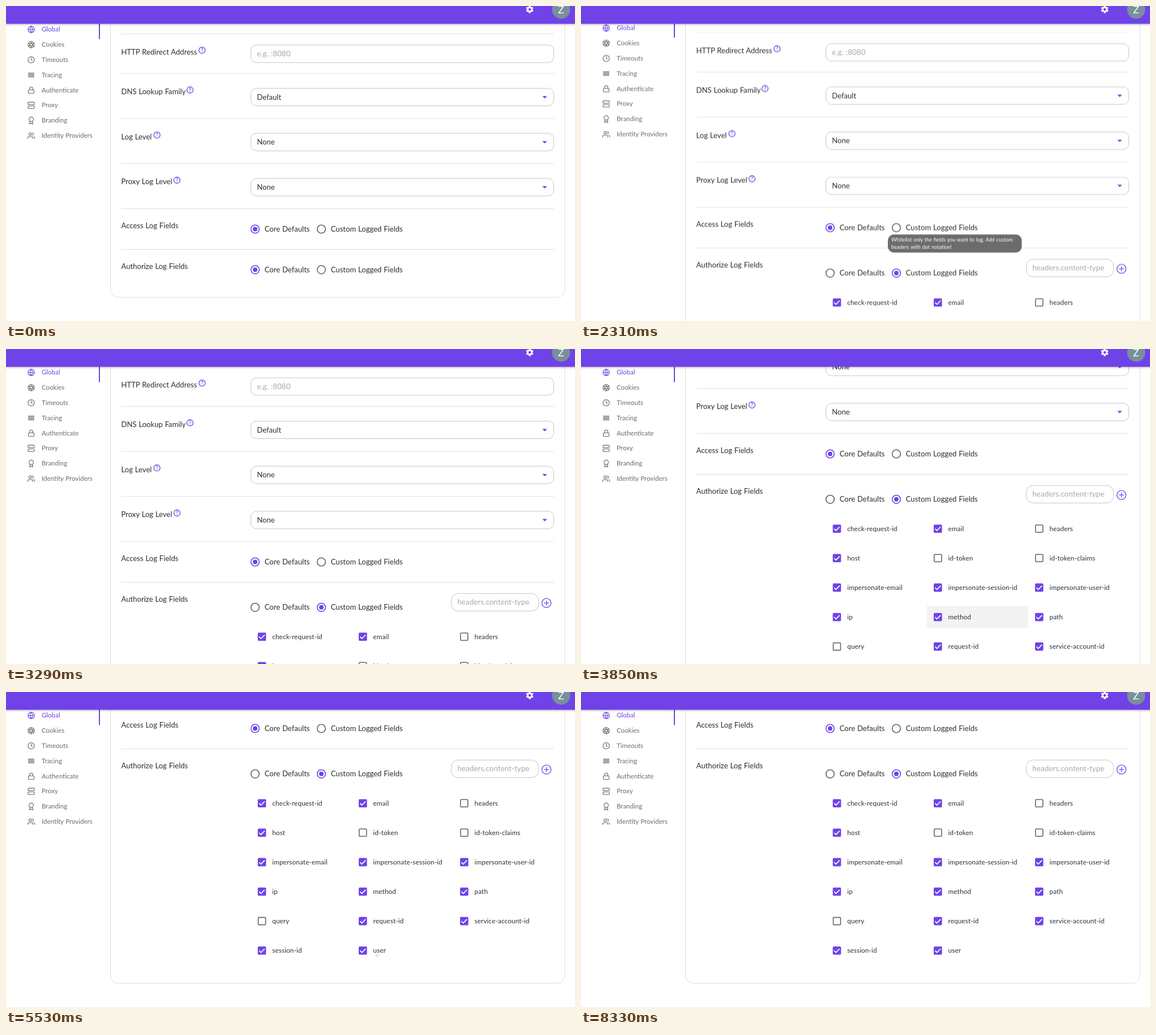
Write an HTML page that moves like this. It is 1005 by 557 pixels and loops after 9100 ms.

```html
<!DOCTYPE html>
<html lang="en">
<head>
<meta charset="utf-8">
<title>Log field settings</title>
<style>
  html, body { margin: 0; width: 100%; height: 100%; overflow: hidden; background: #fff; }
  svg { display: block; width: 1005px; height: 557px; font-family: Lato, "Open Sans", sans-serif; }
  text { font-size: 13.1px; word-spacing: .5px; fill: #2e2e2e; }
  .nav text { font-size: 11.5px; fill: #6b6b6b; }
  .nav .active text { fill: #6f43e7; }
  .icon { fill: none; stroke: #666; stroke-width: 2; stroke-linecap: round; stroke-linejoin: round; }
  .active .icon { stroke: #6f43e7; }
  .hint { font-size: 13.5px; fill: #a9a9a9; }
  .field { fill: #fff; stroke: #c6c6c6; }
  .card { fill: none; stroke: #dedede; }
  .rule { stroke: #e0e0e0; }
  .line { fill: none; stroke: #6f43e7; stroke-width: 1.3; }
  .off { fill: none; stroke: #666; stroke-width: 1.6; }
  .on { fill: none; stroke: #6f43e7; stroke-width: 1.6; }
  .solid { fill: #6f43e7; }
  .tick { fill: none; stroke: #fff; stroke-width: 1.7; }
  .check text { font-size: 11.7px; letter-spacing: .15px; }
  .tip text { font-size: 9.1px; fill: #fff; }
  .help { font-size: 9px; font-weight: 700; fill: #6f43e7; text-anchor: middle; }
  .header { filter: drop-shadow(0 1px 2px rgba(0, 0, 0, .28)); }
</style>
</head>
<body>
<svg id="stage" viewBox="0 0 1005 557"></svg>
<script>
const LOOP = 9100, FRAME = 70;
const COLS = [452, 630.3, 809.3], ROW_TOP = 526.7, ROW_STEP = 52.1;
const stage = document.getElementById('stage');
const $ = id => document.getElementById(id);

// ---- Parts ----
const text = (x, y, s, cls = '') => `<text x="${x}" y="${y}" class="${cls}">${s}</text>`;
const rule = y => `<path class="rule" d="M203.5 ${y}H968"/>`;
const field = (x, y, w, rx) => `<rect class="field" x="${x}" y="${y}" width="${w}" height="31" rx="${rx}"/>`;
const card = bottom => `<rect class="card" x="184.5" y="-400" width="802.5" height="${bottom + 400}" rx="13"/>`;

const help = (x, y) =>
  `<circle class="line" cx="${x}" cy="${y}" r="5.5"/>` + text(x, y + 3.2, '?', 'help');

const select = (y, value) => field(432.5, y - 15.5, 535, 10) + text(443.3, y + 4.5, value) +
  `<path class="solid" d="M947.3 ${y - 1.8}h8.4l-4.2 4.2z"/>`;

const radio = (x, y, label, on) =>
  `<circle class="${on ? 'on' : 'off'}" cx="${x}" cy="${y}" r="7.3"/>` +
  (on ? `<circle class="solid" cx="${x}" cy="${y}" r="4"/>` : '') +
  text(x + 16.7, y + 4.4, label);

const radios = (y, custom) =>
  radio(440, y, 'Core Defaults', !custom) + radio(557, y, 'Custom Logged Fields', custom);

const ticked = (x, y) =>
  `<rect class="solid" x="${x - 7.3}" y="${y - 7.3}" width="14.6" height="14.6" rx="1.8"/>` +
  `<path class="tick" d="M${x - 4.8} ${y + .2}l3.2 3.2l6.4-6.6"/>`;
const empty = (x, y) =>
  `<rect class="off" x="${x - 6.5}" y="${y - 6.5}" width="13" height="13" rx="1.2"/>`;

const rowY = row => ROW_TOP + row * ROW_STEP;
const rowBox = (row, attrs) =>
  `<rect x="610.8" y="${rowY(row) - 19.7}" width="179" height="39.4" ${attrs}/>`;

// A leading "!" marks an unticked box.
const fields = ['check-request-id', 'email', '!headers', 'host', '!id-token', '!id-token-claims',
  'impersonate-email', 'impersonate-session-id', 'impersonate-user-id', 'ip', 'method', 'path',
  '!query', 'request-id', 'service-account-id', 'session-id', 'user'];

const checkbox = (name, i) => {
  const x = COLS[i % 3], y = rowY(Math.floor(i / 3)), label = name.replace('!', '');
  return `<g class="check"><g id="empty-${label}" opacity="${label === name ? 0 : 1}">${empty(x, y)}</g>` +
    `<g id="ticked-${label}" opacity="${label === name ? 1 : 0}">${ticked(x, y)}</g>` +
    text(x + 18.2, y + 4, label) + '</g>';
};

const ring = '<circle cx="12" cy="12" r="10"/>';
const nav = [
  ['Global', ring + '<path d="M2 12h20M12 2a15.3 15.3 0 0 1 0 20a15.3 15.3 0 0 1 0-20"/>'],
  ['Cookies', ring + [0, 60, 120, 180, 240, 300].map(a =>
    `<path d="M14.3 8l5.7 9.9" transform="rotate(${a} 12 12)"/>`).join('')],
  ['Timeouts', ring + '<path d="M12 6v6l4 2"/>'],
  ['Tracing', '<path d="M3 6h18M3 10h18M3 14h18M3 18h18"/>'],
  ['Authenticate', '<rect x="3" y="11" width="18" height="11" rx="2"/><path d="M7 11V7a5 5 0 0 1 10 0v4"/>'],
  ['Proxy', '<rect x="2" y="2" width="20" height="8" rx="2"/><rect x="2" y="14" width="20" height="8" rx="2"/><path d="M6 6h.01M6 18h.01"/>'],
  ['Branding', '<circle cx="12" cy="8" r="7"/><path d="M8.2 13.9L7 23l5-3l5 3l-1.2-9.1"/>'],
  ['Identity Providers', '<path d="M17 21v-2a4 4 0 0 0-4-4H5a4 4 0 0 0-4 4v2M23 21v-2a4 4 0 0 0-3-3.9M16 3.1a4 4 0 0 1 0 7.8"/><circle cx="9" cy="7" r="4"/>']
];
const navItem = ([label, icon], i) => {
  const y = 41.3 + i * 26.83;
  return `<g class="${i ? '' : 'active'}"><g class="icon" transform="translate(37.8 ${y - 6.5}) scale(.56)">${icon}</g>` +
    text(63, y + 4, label) + '</g>';
};

// ---- Presses on a row: start, length, row, pointer height, field, ticked afterwards ----
const presses = [
  [5530, 490, 5, 796, 'user', 0],
  [6160, 350, 5, 796, 'user', 1],
  [6860, 490, 1, 584, 'id-token', 1],
  [7490, 560, 1, 584, 'id-token', 0]
];

const teeth = [0, 60, 120].map(a =>
  `<path d="M925 -.6v13.2" stroke-width="3.4" transform="rotate(${a} 925 6)"/>`).join('');

stage.innerHTML = `
<defs>${[1, 5].map(r => `<clipPath id="row${r}">${rowBox(r, '')}</clipPath>`).join('')}</defs>
<g id="nav" class="nav">
  <path d="M165 20V58.5" stroke="#6f43e7" stroke-width="2"/>
  ${nav.map(navItem).join('')}
</g>
<g id="content">
  ${[49.5, 119.5, 199, 278.8, 358.5, 430.5].map(rule).join('')}
  ${text(203.5, 85.5, 'HTTP Redirect Address')}${help(346.3, 78.2)}
  ${field(432.5, 69, 535, 10)}${text(443.3, 88.6, 'e.g. :8080', 'hint')}
  ${text(203.5, 156, 'DNS Lookup Family')}${help(325, 148.5)}${select(161, 'Default')}
  ${text(203.5, 235.5, 'Log Level')}${help(266.6, 228.2)}${select(240.7, 'None')}
  ${text(203.5, 315.2, 'Proxy Log Level')}${help(302, 308)}${select(320.4, 'None')}
  ${text(203.5, 392.5, 'Access Log Fields')}${radios(394.5, false)}
  ${text(203.5, 464.5, 'Authorize Log Fields')}
  <g id="closed">${card(515)}${radios(466.3, false)}</g>
  <g id="open" opacity="0">
    ${card(845)}
    ${rowBox(3, 'id="hover" fill="#f3f3f3" opacity="0"')}
    <circle id="halo" cx="557" cy="474.8" r="15.5" fill="#6f43e7" opacity="0"/>
    ${radios(474.8, true)}
    ${field(786.5, 450.3, 154, 12)}${text(797.3, 470, 'headers.content-type', 'hint')}
    <g class="line"><circle cx="954.6" cy="467.2" r="8"/><path d="M950.2 467.2h8.8m-4.4-4.4v8.8"/></g>
    ${fields.map(checkbox).join('')}
    ${presses.map(([, , row, y], i) =>
      `<g clip-path="url(#row${row})"><circle id="ripple${i}" cx="656" cy="${y}" r="0" opacity="0"/></g>`).join('')}
  </g>
  <g id="tip" class="tip" opacity="0">
    <rect x="542" y="406.5" width="236.5" height="32" rx="11" fill="#616161" fill-opacity=".93"/>
    ${text(548, 419, 'Whitelist only the fields you want to log. Add custom')}
    ${text(548, 432.3, 'headers with dot notation!')}
  </g>
</g>
<rect class="header" x="-10" y="-10" width="1025" height="41.5" fill="#6f43e7"/>
<g stroke="#fff" fill="none">${teeth}<circle cx="925" cy="6" r="3.7" stroke-width="2.6"/></g>
<circle cx="925" cy="6" r="2.3" fill="#6f43e7"/>
<circle cx="980.5" cy="6.5" r="16" fill="#78909c"/>
<text x="980.5" y="12.8" text-anchor="middle" style="font-size:18px;fill:#fff">Z</text>`;

// ---- Motion: every track is a list of [ms, value] holds ----
function track(id, prop, steps) {
  const frames = steps.map(([ms, value]) =>
    ({ offset: Math.max(0, ms - 1) / LOOP, [prop]: value, easing: 'step-end' }));
  frames.push({ offset: 1, [prop]: steps[steps.length - 1][1] });
  $(id).animate(frames, { duration: LOOP, iterations: Infinity });
}
const run = (start, values) => values.map((v, i) => [start + i * FRAME, v]);
const shift = steps => steps.map(([ms, y]) => [ms, `translateY(${y}px)`]);

const bounce = [[0, 0], ...run(2310, [-2.5, -3.8, -4.6, -5, -5.2]), ...run(2730, [-3, -1.4, -.6, 0])];
const scroll = [
  ...run(3290, [-18, -78, -142, -190, -209]),
  ...run(3990, [-215, -230, -249, -265, -276, -283]),
  ...run(4480, [-297.5, -318, -330])
];
track('nav', 'transform', shift(bounce));
track('content', 'transform', shift([...bounce, ...scroll]));

track('tip', 'opacity', [[0, 0], ...run(1260, [.35, .8, 1]), ...run(3080, [.4, 0])]);
track('closed', 'opacity', [[0, 1], [1680, 0]]);
track('open', 'opacity', [[0, 0], [1680, 1]]);
track('halo', 'opacity', [[0, 0], ...run(1680, [.08, .18, .2, .14, .08]), [2100, 0]]);
track('hover', 'opacity', [[0, 0], [3570, 1], [4620, 0]]);

// Grows fast, settles slowly; the fade begins when the press is released.
const ease = p => 1 - (1 - Math.min(1, Math.max(0, p)) ** 2) ** 5.2;
presses.forEach(([start, length], i) => {
  const radius = [[0, '0px']], alpha = [[0, 0]];
  for (let t = 0; t < length; t += FRAME) {
    const age = t + 36, grown = ease(age / 550);
    radius.push([start + t, `${137 * grown}px`]);
    alpha.push([start + t, .87 * (.1 + .2 * grown) * (1 - ease((age - 121) / 550))]);
  }
  alpha.push([start + length, 0]);
  track('ripple' + i, 'r', radius);
  track('ripple' + i, 'opacity', alpha);
});

for (const name of ['user', 'id-token']) {
  const mine = presses.filter(p => p[4] === name);
  const states = [[0, 1 - mine[0][5]], ...mine.map(p => [p[0] + 2 * FRAME, p[5]])];
  track('ticked-' + name, 'opacity', states);
  track('empty-' + name, 'opacity', states.map(([ms, on]) => [ms, 1 - on]));
}
</script>
</body>
</html>
```
